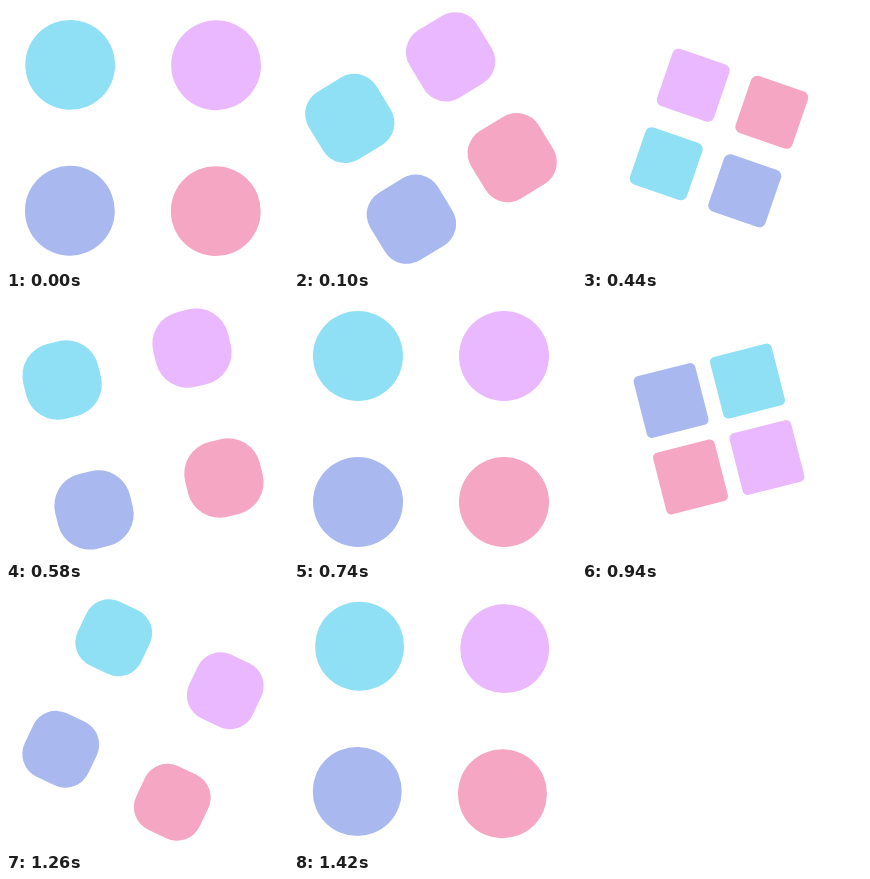
An HTML page that plays this animation: 282 px wide and 263 px high, repeating every 1440 ms.

```html
<!DOCTYPE html>
<html lang="en">
<head>
<meta charset="utf-8">
<title>Four shapes loader</title>
<style>
  html, body { margin: 0; width: 100%; height: 100%; overflow: hidden; background: #fff; }
  svg { display: block; width: 282px; height: 263px; }
</style>
</head>
<body>
<svg viewBox="0 0 282 263">
  <g id="group">
    <rect fill="#8fdff5"/>
    <rect fill="#eab8fe"/>
    <rect fill="#a9b8ef"/>
    <rect fill="#f5a6c2"/>
  </g>
</svg>
<script>
const LOOP = 1440, STEP = 20, CYCLE = 1449, DELAY = 19;
const CX = 137, CY = 132;
const group = document.getElementById('group');
const rects = [...group.children];

const mix = (a, b, k) => a + (b - a) * k;

// Same timing curves as CSS cubic-bezier()
function bezier(x1, y1, x2, y2) {
  const at = (a, b, t) => 3 * a * t * (1 - t) ** 2 + 3 * b * t * t * (1 - t) + t ** 3;
  return x => {
    let lo = 0, hi = 1;
    for (let i = 0; i < 30; i++) {
      const mid = (lo + hi) / 2;
      if (at(x1, x2, mid) < x) lo = mid; else hi = mid;
    }
    return at(y1, y2, (lo + hi) / 2);
  };
}
const ease = bezier(0.25, 0.1, 0.25, 1);
const easeInOut = bezier(0.42, 0, 0.58, 1);

function draw(time) {
  // Quarters: turn left and close, open, turn right and close, open
  const phase = ((time - DELAY + CYCLE) % CYCLE) / CYCLE * 4;
  const quarter = Math.floor(phase);
  const u = phase - quarter;
  const opening = quarter % 2 === 1;
  const turn = opening ? 1 - ease(u) : ease(u);
  const shrink = opening ? 1 - easeInOut(u) : turn;

  const angle = (quarter < 2 ? -90 : 90) * turn;
  const offset = mix(73, 33.1, turn);
  const size = mix(90, 58.5, shrink);
  const radius = size * mix(0.5, 0, turn);

  group.setAttribute('transform', `translate(${CX} ${CY}) rotate(${angle})`);
  rects.forEach((rect, i) => {
    const attrs = {
      x: (i % 2 ? offset : -offset) - size / 2,
      y: (i > 1 ? offset : -offset) - size / 2,
      width: size, height: size, rx: radius, ry: radius
    };
    for (const name in attrs) rect.setAttribute(name, attrs[name]);
  });
}

const start = performance.now();
function tick() {
  const time = (performance.now() - start) % LOOP;
  draw(Math.floor(time / STEP) * STEP);
  requestAnimationFrame(tick);
}
tick();
</script>
</body>
</html>
```
